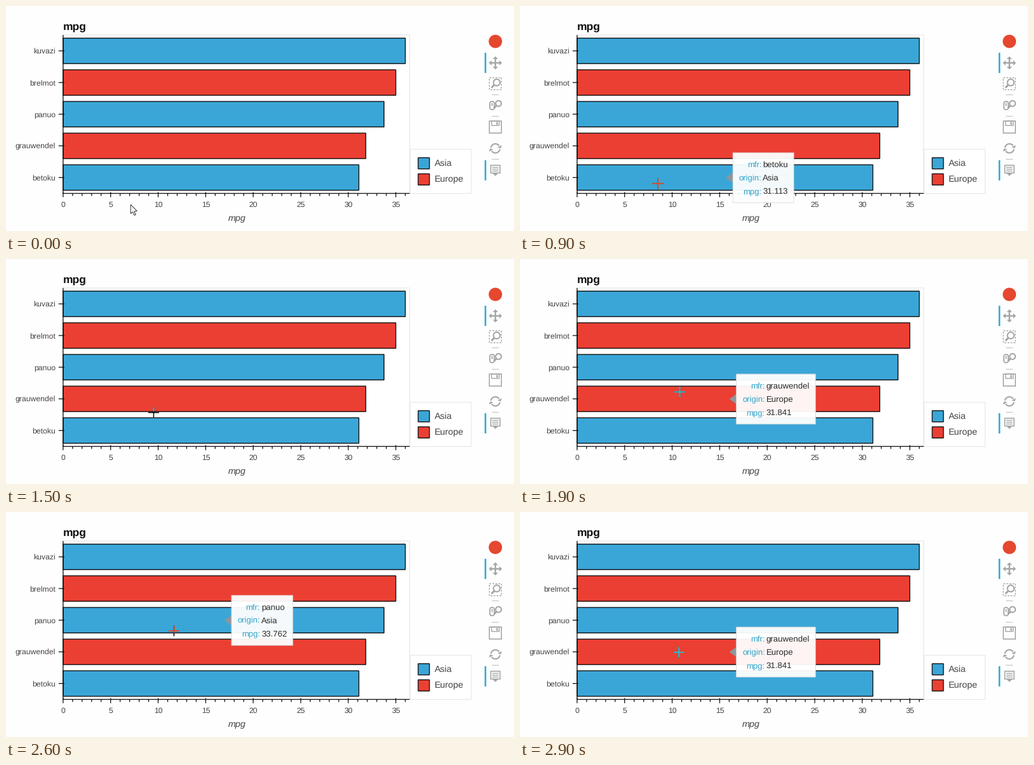
Recreate the animation shown at these times as a matplotlib script. Size 800x356 px, loop 3 s.

```python
import numpy as np
import matplotlib.pyplot as plt
from matplotlib.animation import FuncAnimation
from matplotlib.patches import Arc, Circle, FancyBboxPatch, Polygon, Rectangle

W, H, DPI = 800, 356, 100
PX = 72 / DPI  # points per pixel
FRAMES, STEP = 30, 100

BLUE, RED = "#3aa6d7", "#ec3f33"
INVERSE = {BLUE: "#d2502f", RED: "#35b4c6"}
ORIGIN = {BLUE: "Asia", RED: "Europe"}
INK, GRID, ICON = "#111111", "#e5e5e5", "#a3a6a8"

X0, UNIT = 89.9, 14.97
TOP, BOTTOM, RIGHT = 45.8, 296.5, 635.7
PITCH, THICK = 50.1, 40.3
BARS = [
    ("kuvazi", 36.0, BLUE),
    ("brelmot", 35.0, RED),
    ("panuo", 33.762, BLUE),
    ("grauwendel", 31.841, RED),
    ("betoku", 31.113, BLUE),
]

plt.rcParams.update({"font.family": "Liberation Sans", "text.hinting": "none",
                     "path.snap": False})
fig = plt.figure(figsize=(W / DPI, H / DPI), dpi=DPI, facecolor="#fefefe")
ax = fig.add_axes([0, 0, 1, 1])
ax.set_xlim(0, W)
ax.set_ylim(H, 0)
ax.axis("off")


def line(xs, ys, color=INK, lw=1.3, z=3):
    return ax.plot(xs, ys, color=color, lw=lw * PX, zorder=z,
                   solid_capstyle="butt")[0]


def shape(patch, fill="none", edge="none", lw=1.0, z=3, **kw):
    patch.set(facecolor=fill, edgecolor=edge, linewidth=lw * PX, zorder=z, **kw)
    return ax.add_patch(patch)


def rect(x, y, w, h, *style, **kw):
    return shape(Rectangle((x, y), w, h), *style, **kw)


def text(x, y, s, size, color="#444444", ha="left", z=4, **kw):
    return ax.text(x, y, s, fontsize=size * PX, color=color, ha=ha,
                   va="baseline", zorder=z, **kw)


def bar_y(i):
    return 71.0 + PITCH * i


def draw_chart():
    rect(X0, TOP, RIGHT - X0, BOTTOM - TOP, "white", GRID, z=1)
    patches = []
    for i, (name, value, color) in enumerate(BARS):
        y = bar_y(i)
        patches.append(rect(X0, y - THICK / 2, value * UNIT, THICK,
                            color, INK, 1.4, z=2))
        line([X0 - 7, X0 + 2], [y, y])
        text(78, y + 4.3, name, 12.25, ha="right")
    line([X0, X0], [TOP, BOTTOM])
    line([X0, RIGHT], [BOTTOM, BOTTOM])
    for v in range(37):
        x = X0 + v * UNIT
        major = v % 5 == 0
        line([x, x], [BOTTOM - 2 * major, BOTTOM + (6 if major else 4)])
        if major:
            text(x, 318, str(v), 12.3, ha="center")
    text(89.5, 37.3, "mpg", 17.5, "#111111", weight="bold")
    text(363.5, 340, "mpg", 14.4, style="italic", ha="center")
    return patches


def draw_legend():
    rect(636.2, 226.7, 96.3, 70, "white", GRID, z=1)
    for y, color in ((240, BLUE), (265.5, RED)):
        rect(649.1, y, 17.7, 17.7, color, INK, 1.4)
        text(674.5, y + 13, ORIGIN[color], 14.3)


def magnifier(x, y, r):
    shape(Circle((x, y), r), "none", ICON, 2)
    line([x - 0.7 * r, x - 1.6 * r], [y + 0.7 * r, y + 1.6 * r], ICON, 3)


def arrowhead(x, y, angle, size):
    """Triangle with its tip at (x, y), pointing along angle."""
    d = np.array([np.cos(angle), np.sin(angle)])
    side = np.array([-d[1], d[0]])
    tip = np.array([x, y])
    shape(Polygon([tip, tip - size * (d + side), tip - size * (d - side)]), ICON)


def draw_toolbar():
    cx = 770.7
    shape(Circle((cx, 56), 10.5), "#e5472f")
    for y in (74, 244):
        rect(753.7, y, 2.6, 32, "#35a9d3")
    for y in (140.5, 174.5, 242.5):
        line([cx - 5.5, cx + 5.5], [y, y], "#c4c6c7", 1.2)

    # pan
    cy = 90
    for angle in np.arange(4) * np.pi / 2:
        dx, dy = np.cos(angle), np.sin(angle)
        line([cx, cx + 7 * dx], [cy, cy + 7 * dy], ICON, 2.4)
        arrowhead(cx + 10.3 * dx, cy + 10.3 * dy, angle, 4.2)

    # box zoom
    rect(cx - 9.5, 113.5, 19, 19, "none", ICON, 1.4, linestyle=(0, (2, 1.4)))
    magnifier(772.8, 121, 5.2)

    # wheel zoom
    shape(FancyBboxPatch((762, 151), 7, 13,
                         boxstyle="round,pad=0,rounding_size=3.4"),
          "none", ICON, 1.8)
    line([765.5, 765.5], [153.5, 158], ICON, 1.8)
    magnifier(775.6, 154.3, 4.5)

    # save
    rect(cx - 9.5, 182, 19, 19, "none", ICON, 1.6)
    rect(cx - 6, 182, 12, 7, "none", ICON, 1.4)
    rect(cx + 1.5, 183.5, 2.4, 4.3, ICON)

    # reset
    cy, r = 225.3, 7.2
    for turn in (0, 180):
        shape(Arc((cx, cy), 2 * r, 2 * r, theta1=190 + turn,
                  theta2=325 + turn), "none", ICON, 2.1)
        a = np.radians(turn)
        arrowhead(cx + 8.5 * np.cos(a), cy + 8.5 * np.sin(a), a + 1.1, 3.8)

    # hover
    rect(cx - 7.3, 252, 14.6, 12.3, "none", ICON, 1.6)
    arrowhead(cx, 269, np.pi / 2, 4)
    for y in (255.3, 258.2, 261.1):
        line([cx - 5, cx + 5], [y, y], ICON, 1.3)


def make_tooltip(i):
    name, value, color = BARS[i]
    y = bar_y(i) + 0.3
    left = X0 + value * UNIT / 2 + 12.5
    rows = (("mfr:", name), ("origin:", ORIGIN[color]), ("mpg:", f"{value:.3f}"))
    labels, entries = [], []
    for k, (label, entry) in enumerate(rows):
        base = y + 4.2 + 21 * (k - 1)
        labels.append(text(left + 45, base, label, 13.1, "#2ea5cb", "right", 8))
        entries.append(text(left + 47, base, entry, 13.2, "#2b2b2b", z=8))
    right = max(t.get_window_extent().x1 for t in entries) + 9
    box = rect(left, y - 39.5, right - left, 79, "white", "#dcdcdc", z=7,
               alpha=0.95)
    pointer = shape(Polygon([(left - 11, y), (left, y - 8), (left, y + 8)]),
                    "#909599", z=6)
    return [box, pointer, *labels, *entries]


bars = draw_chart()
draw_legend()
draw_toolbar()
tooltips = [make_tooltip(i) for i in range(len(BARS))]

ARROW = np.array([(0, 0), (0, 14.5), (3.3, 11.5), (5.8, 17), (8, 16),
                  (5.6, 10.6), (10, 10.2)])
arrow = shape(Polygon(ARROW + (196.3, 314.2)), "white", "#444444", 1.1, z=9)

# The crosshair inverts whatever lies beneath it.
crosses = [line([], [], INK, 1.6, z=4)]
for bar, (_, _, color) in zip(bars, BARS):
    cross = line([], [], INVERSE[color], 2.1, z=5)
    cross.set_clip_path(bar)
    crosses.append(cross)

ARM = 8.5
ENTER = 4  # step at which the pointer reaches the plot
STOPS = np.array([(211.5, 289), (217, 281), (232.5, 243), (264.5, 188),
                  (250.2, 222)])
GLIDES = [(4, 9), (10, 13), (17, 21), (26, 29)]


def ease_out(n, start, end):
    p = np.clip((n - start) / (end - start), 0, 1)
    return 1 - (1 - p) ** 1.3


def pointer_at(n):
    progress = [ease_out(n, *glide) for glide in GLIDES]
    return STOPS[0] + progress @ np.diff(STOPS, axis=0)


def update(n):
    x, y = pointer_at(n)
    inside = n >= ENTER
    arrow.set_visible(not inside)
    for cross in crosses:
        cross.set_data([x - ARM, x + ARM, np.nan, x, x],
                       [y, y, np.nan, y - ARM, y + ARM])
        cross.set_visible(inside)
    for i, parts in enumerate(tooltips):
        hovered = inside and abs(y - bar_y(i)) < THICK / 2
        for part in parts:
            part.set_visible(hovered)
    return []


anim = FuncAnimation(fig, update, frames=FRAMES, interval=STEP,
                     init_func=lambda: update(0), repeat=True, blit=False)
plt.show()
```
